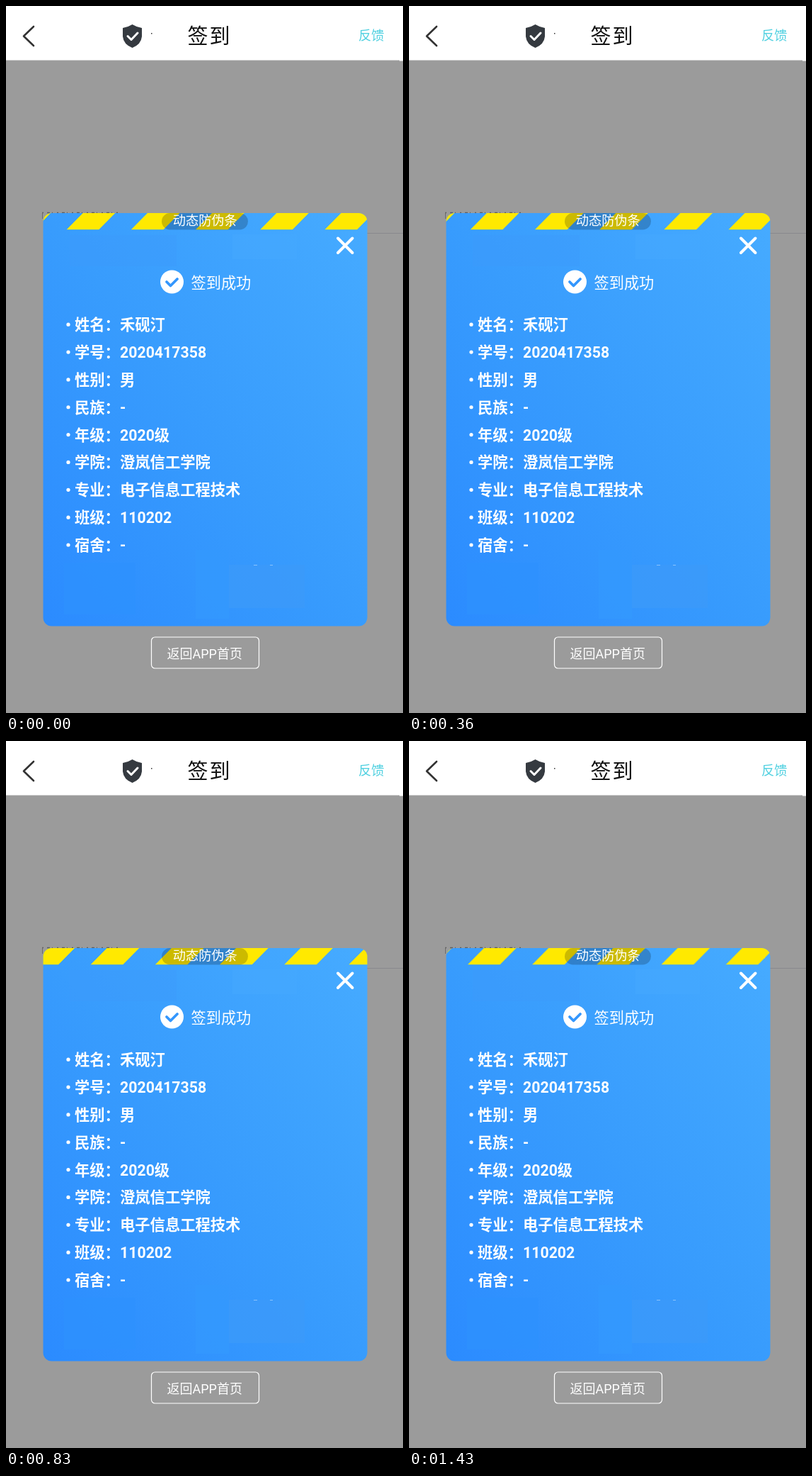
Write an HTML page that moves like this. It is 561 by 997 pixels and loops after 1.46 s.

```html
<!DOCTYPE html>
<html lang="zh-CN">
<head>
<meta charset="utf-8">
<title>签到</title>
<style>
  html, body { margin: 0; width: 100%; height: 100%; overflow: hidden; background: #9b9b9b; }
  svg { display: block; width: 561px; height: 997px; }
  text { font-family: Roboto, "Noto Sans CJK SC", "Noto Sans CJK", sans-serif; fill: #fff; }
  .row { font-size: 21.3px; font-weight: 700; }
  .line { fill: none; stroke-linecap: round; stroke-linejoin: round; }
</style>
</head>
<body>
<svg viewBox="0 0 561 997">
  <defs>
    <linearGradient id="blue" x1="0" y1="1" x2="1" y2="0">
      <stop offset="0" stop-color="#2b8bff"/>
      <stop offset=".5" stop-color="#389cfd"/>
      <stop offset="1" stop-color="#46abff"/>
    </linearGradient>
    <clipPath id="card"><rect x="52.500" y="292" width="458" height="582.500" rx="12"/></clipPath>
  </defs>

  <rect width="561" height="997" fill="#9b9b9b"/>
  <path d="M0 0H561V77.500H556V76.500H0Z" fill="#fff"/>
  <path class="line" d="M39 29L25 42.500L39 56" stroke="#333" stroke-width="2.600"/>
  <path d="M178.500 26Q185 30 192 31V43Q191 54 178.500 59Q166 54 165 43V31Q172 30 178.500 26Z" fill="#353a40"/>
  <path class="line" d="M172 42.500L177 47.500L186 38" stroke="#fff" stroke-width="3"/>
  <rect x="205" y="38" width="1.500" height="1.500" fill="#333"/>
  <text x="256.500" y="53" font-size="29" letter-spacing="2" style="fill:#111">签到</text>
  <text x="498" y="48" font-size="18.300" style="fill:#4fd0e0">反馈</text>

  <path d="M510 320.500H561" stroke="#88888d"/>
  <path d="M51 291.500H160" stroke="#5f5f60" stroke-width="1.500" stroke-dasharray="2 5 4 3 1 6"/>
  <path d="M51.500 291V300" stroke="#6b6b6b"/>

  <g clip-path="url(#card)">
    <rect x="52" y="292" width="459" height="583" fill="url(#blue)"/>
    <rect x="90" y="323" width="151" height="44" fill="#3d98fb" opacity=".4"/>
    <rect x="320" y="322" width="91" height="35" fill="#45a8ff" opacity=".6"/>
    <rect x="82" y="785" width="101" height="73" fill="#2d91fe" opacity=".8"/>
    <rect x="268" y="767" width="47" height="97" fill="#3499fe" opacity=".8"/>
    <rect x="315" y="788" width="107" height="61" fill="#3b9afb" opacity=".8"/>
    <path d="M350 788.500H355M373 788.500H377" stroke="#d8ecff" opacity=".5"/>
    <g id="stripes" fill="#ffe900"></g>
  </g>

  <rect x="220" y="292" width="122" height="23.500" rx="11.750" opacity=".2"/>
  <text x="235.800" y="309.300" font-size="18.200">动态防伪条</text>
  <path class="line" d="M469 327.500L489.500 348M489.500 327.500L469 348" stroke="#fff" stroke-width="4"/>
  <circle cx="234.500" cy="389" r="16.500" fill="#fff"/>
  <path class="line" d="M227 389L232.500 394.500L242 385" stroke="#3497fd" stroke-width="3.800"/>
  <text x="261.500" y="398" font-size="21.200">签到成功</text>
  <g id="rows"></g>

  <rect x="205.500" y="890" width="152" height="44" rx="5" fill="none" stroke="#fff" stroke-width="1.200"/>
  <text x="227.500" y="919.500" font-size="18">返回APP首页</text>
</svg>
<script>
  const NS = 'http://www.w3.org/2000/svg';
  const PERIOD = 91.2, LOOP = 1460;

  function add(parent, tag, attrs, text = '') {
    const el = document.createElementNS(NS, tag);
    for (const k in attrs) el.setAttribute(k, attrs[k]);
    el.textContent = text;
    parent.append(el);
  }

  const rows = document.getElementById('rows');
  [['姓名', '禾砚汀'], ['学号', '2020417358'], ['性别', '男'], ['民族', '-'], ['年级', '2020级'],
   ['学院', '澄岚信工学院'], ['专业', '电子信息工程技术'], ['班级', '110202'], ['宿舍', '-']
  ].forEach(([label, value], i) => {
    const y = 457.2 + i * 38.85;
    add(rows, 'circle', { cx: 88, cy: y - 8, r: 2.6, fill: '#fff' });
    add(rows, 'text', { class: 'row', x: 97, y }, label + '：');
    add(rows, 'text', { class: 'row', x: 161, y }, value);
  });

  const stripes = document.getElementById('stripes');
  for (let i = -2; i < 5; i++) {
    add(stripes, 'path', { d: `M${85.7 + i * PERIOD} 315.300l23 -23.300h45.600l-23 23.300z` });
  }

  // [step, shift]: nearly still at first, then a steady run of one period
  const KEYS = [[0, 0], [3, 0.3], [9, 1.9], [15, 34], [19, 52], [23, 67.5], [27, 88.5]];
  const STEPS = 28;

  function shiftAt(n) {
    const i = Math.max(1, KEYS.findIndex(k => k[0] >= n));
    const [a, x] = KEYS[i - 1], [b, y] = KEYS[i];
    return x + (y - x) * (n - a) / (b - a);
  }

  // Steps alternate between 30 and 70 ms after a first hold of 130 ms;
  // each starts 1 ms early so that rounding never delays it.
  function startOf(n) {
    return n ? 129 + 100 * Math.floor((n - 1) / 2) + 30 * ((n - 1) % 2) : 0;
  }

  const frames = Array.from({ length: STEPS }, (_, n) => ({
    offset: startOf(n) / LOOP,
    transform: `translateX(${shiftAt(n)}px)`,
    easing: 'steps(1, end)'
  }));
  frames.push({ offset: 1, transform: `translateX(${PERIOD}px)` });
  stripes.animate(frames, { duration: LOOP, iterations: Infinity });
</script>
</body>
</html>
```
